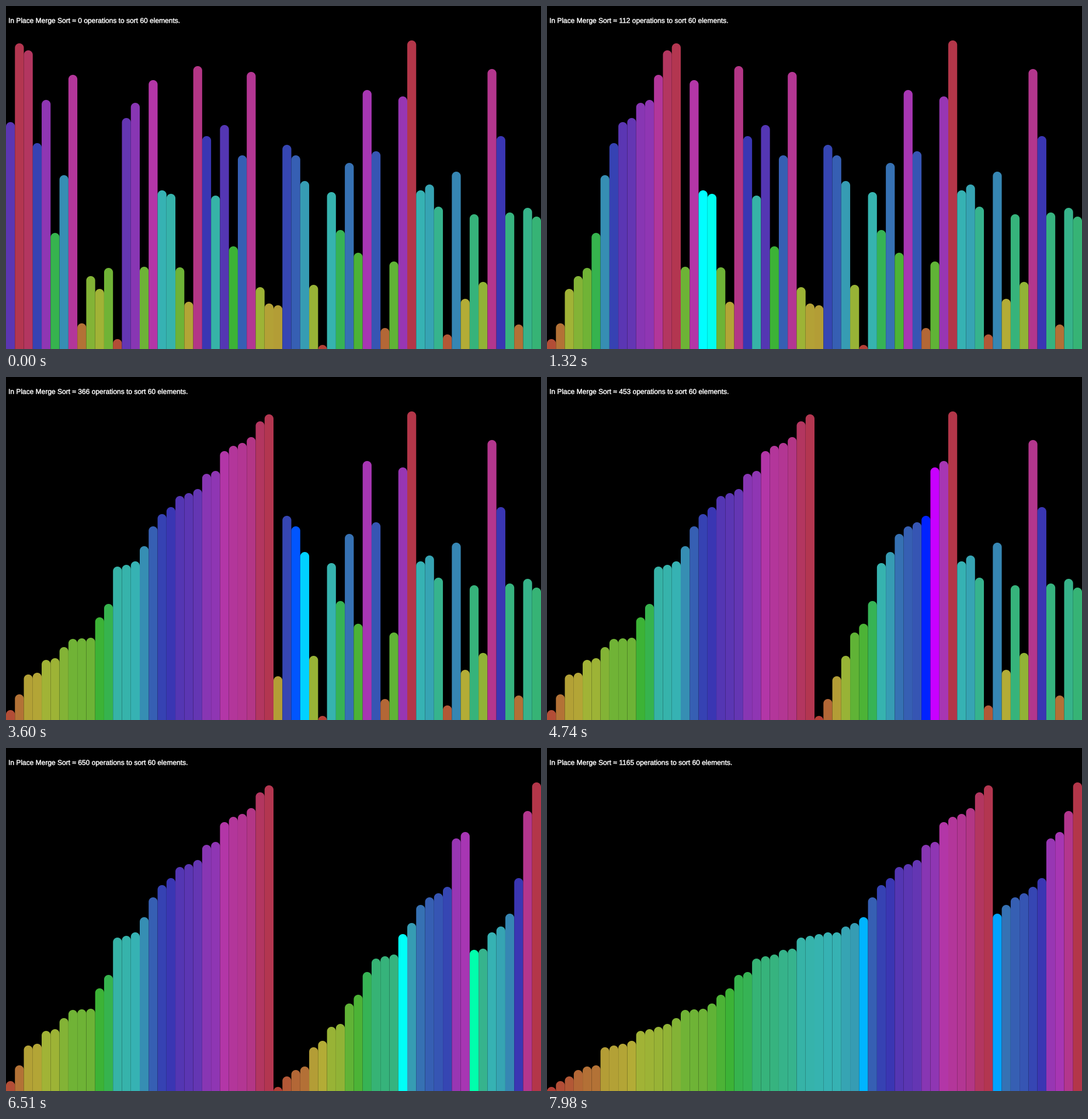
These frames come from a looping animation (916 by 588 pixels, 8 s). A matplotlib script:

```python
import colorsys

import matplotlib.pyplot as plt
import numpy as np
from matplotlib.animation import FuncAnimation
from matplotlib.collections import PolyCollection
from matplotlib.patches import PathPatch
from matplotlib.textpath import TextPath
from matplotlib.transforms import Affine2D

W, H, DPI = 916, 588, 100
FRAMES, INTERVAL = 400, 20
STEP = 30                               # ms per comparison
HOLDS = (1, 12, 45, 52, 60, 67, 74)     # steps on which the sort pauses
HUE_SPAN = 543

VALUES = [
    389, 524, 512, 353, 427, 199, 298, 470, 44, 125, 103, 139, 17, 396, 422,
    141, 461, 272, 266, 140, 81, 485, 365, 263, 384, 176, 332, 475, 106, 78,
    75, 350, 332, 288, 110, 7, 269, 204, 319, 165, 444, 339, 36, 150, 433,
    529, 272, 282, 244, 25, 304, 86, 231, 115, 480, 365, 234, 42, 242, 227,
]
N = len(VALUES)
BAR = W / N


def merge_sort(a, lo, hi, ops):
    """Yield the pair about to be compared; ops[0] counts compares and shifts."""
    if lo >= hi:
        return
    mid = (lo + hi) // 2
    yield from merge_sort(a, lo, mid, ops)
    yield from merge_sort(a, mid + 1, hi, ops)
    i, j = lo, mid + 1
    while i <= mid and j <= hi:
        yield i, j
        ops[0] += 1
        if a[i] > a[j]:
            a.insert(i, a.pop(j))
            ops[0] += j - i
            mid += 1
            j += 1
        i += 1


def record():
    a, ops = list(VALUES), [0]
    states = [(list(a), (), 0)]
    for pair in merge_sort(a, 0, N - 1, ops):
        states.append((list(a), pair, ops[0]))
    states.append((list(a), (), ops[0]))
    return states


def bar_shape(k, value):
    r = BAR / 2
    t = np.linspace(np.pi, 2 * np.pi, 25)
    x = (k + 0.5) * BAR + r * np.cos(t)
    y = H - value + r + r * np.sin(t)
    return np.column_stack([np.r_[x, x[-1], x[0]], np.r_[y, H + 20, H + 20]])


def bar_color(value, lit):
    s = 1.0 if lit else 0.7
    return colorsys.hsv_to_rgb(value / HUE_SPAN, s, s)


def label_path(ops):
    text = f"In Place Merge Sort ≈ {ops} operations to sort {N} elements."
    place = Affine2D().scale(1, -1).translate(4, 29)
    return place.transform_path(TextPath((0, 0), text, size=12))


plt.rcParams["font.family"] = "Liberation Sans"
plt.rcParams["toolbar"] = "None"

fig = plt.figure(figsize=(W / DPI, H / DPI), dpi=DPI, facecolor="black")
ax = fig.add_axes([0, 0, 1, 1])
ax.set_xlim(0, W)
ax.set_ylim(H, 0)
ax.axis("off")

bars = PolyCollection([], linewidths=0, edgecolors="none", antialiased=True)
bars.set_snap(False)
ax.add_collection(bars, autolim=False)
label = PathPatch(label_path(0), facecolor="white", edgecolor="white", lw=0.32)
label.set_snap(False)
ax.add_patch(label)

STATES = record()


def draw(frame):
    step = (frame * INTERVAL + INTERVAL // 2) // STEP
    n = step - sum(h <= step for h in HOLDS)
    values, pair, ops = STATES[min(n, len(STATES) - 1)]
    bars.set_verts([bar_shape(k, v) for k, v in enumerate(values)])
    bars.set_facecolor([bar_color(v, k in pair) for k, v in enumerate(values)])
    label.set_path(label_path(ops))
    return bars, label


anim = FuncAnimation(fig, draw, frames=FRAMES, interval=INTERVAL,
                     init_func=lambda: draw(0), repeat=True, repeat_delay=0)
plt.show()
```
